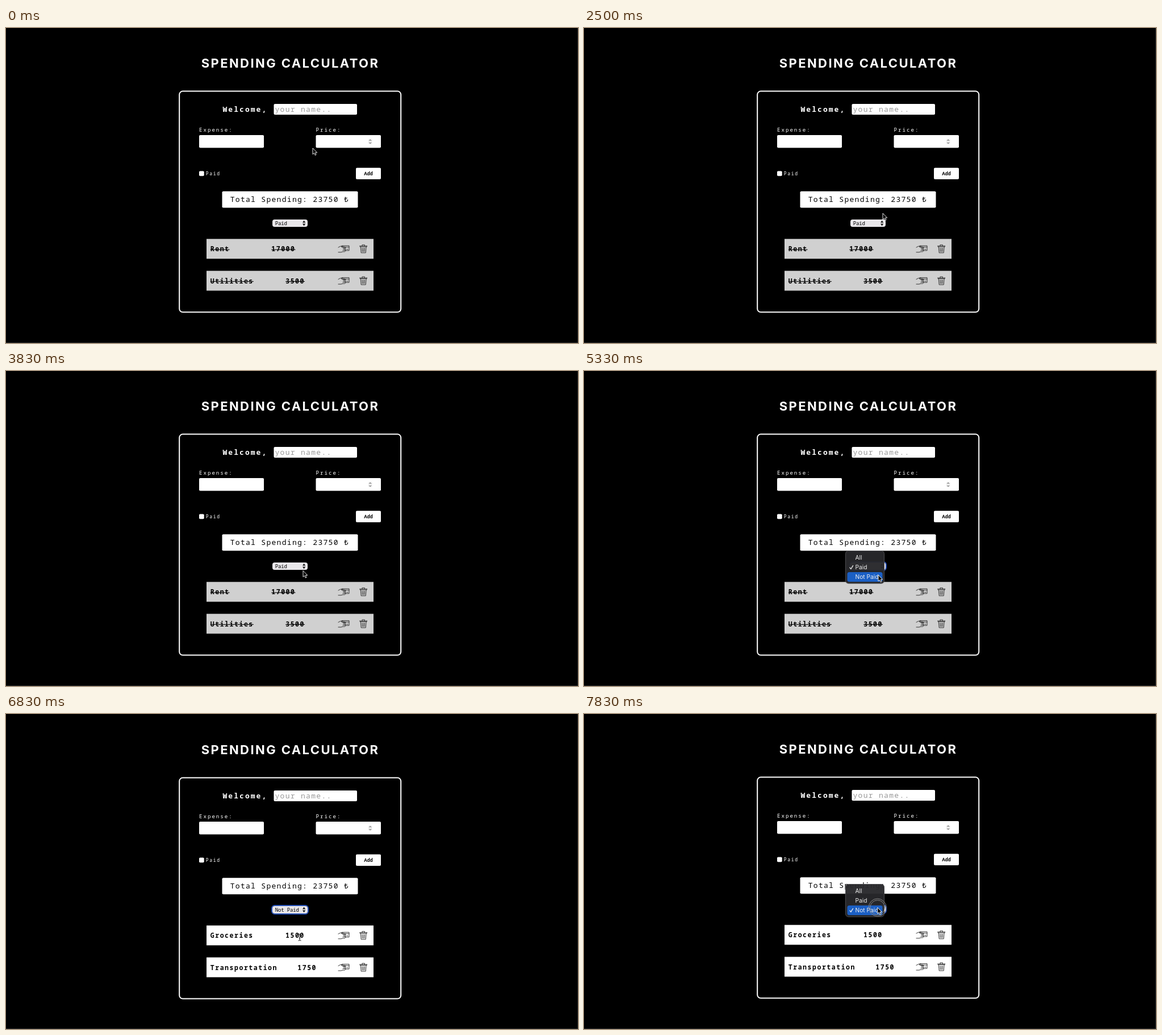
An HTML page for the animation above (8000 ms loop, 1007 by 556 pixels).

```html
<!DOCTYPE html>
<html lang="en">
<head>
<meta charset="utf-8">
<title>Spending Calculator</title>
<style>
  html, body { margin: 0; width: 100%; height: 100%; overflow: hidden; background: #000; }
  svg { display: block; width: 1007px; height: 556px; }
  text { font-family: "Noto Sans Mono", "DejaVu Sans Mono", monospace; white-space: pre; }
  .title { font: 700 22px Inter, sans-serif; letter-spacing: 2.4px; text-anchor: middle; }
  .welcome { font-size: 13px; font-weight: 700; letter-spacing: 2.05px; }
  .hint { font-size: 13px; letter-spacing: 1.3px; fill: #999; }
  .label { font-size: 9.2px; letter-spacing: 1.95px; }
  .small { font-size: 8px; letter-spacing: 1.7px; }
  .add { font: 700 8px "Open Sans", sans-serif; text-anchor: middle; }
  .total { font-size: 13px; font-weight: 500; letter-spacing: 1.3px; }
  .choice { font-size: 9px; letter-spacing: -.15px; }
  .item { font-size: 11.5px; font-weight: 700; letter-spacing: 1.54px; }
  .icon { fill: none; stroke: #222; stroke-width: .9; stroke-linejoin: round; stroke-linecap: round; }
  .option { font: 10.2px Inter, sans-serif; fill: #f0f0f0; }
  .ring circle { fill: none; stroke: #8a8a8a; stroke-width: 1; }
  .hidden { display: none; }
</style>
</head>
<body>
<svg viewBox="0 0 1007 556" fill="#fff">
  <defs>
    <g id="pay" class="icon">
      <path d="M6 -3.5V-5.5H19V3H12M6 -3H19M15 .8H17"/>
      <path d="M0 -2.5 3.5 -4.5H6L12.5 -3 13 -1.5 8 -1.7M0 6H5L8 5H11.5L13 3.4 11 2.2 8 2.6M11 2.2 13.3 1.2 12.6 -.2 9 .2"/>
    </g>
    <g id="trash" class="icon">
      <path d="M-6.3 -5H6.3M-6 -5V-3.6H6V-5M-2.3 -5V-7H2.3V-5M-5 -3.4-4 7H4L5 -3.4"/>
      <path d="M-2.4 -1.5-2 5M0 -1.5V5M2.4 -1.5 2 5"/>
    </g>
  </defs>

  <path d="M1006 0h1v556h-1zM0 555h1007v1H0z" fill="#2a2a2a"/>

  <g id="page">
    <text class="title" x="500.5" y="70">SPENDING CALCULATOR</text>
    <rect x="305.2" y="111.6" width="390" height="390" rx="6" fill="none" stroke="#fff" stroke-width="2"/>

    <text class="welcome" x="381.5" y="148">Welcome,</text>
    <rect x="471.5" y="134" width="146.5" height="19" rx="2"/>
    <text class="hint" x="473.5" y="148">your name..</text>

    <text class="label" x="340" y="183.2">Expense:</text>
    <rect x="340" y="189" width="114" height="22.5" rx="2"/>
    <text class="label" x="545.6" y="183.2">Price:</text>
    <rect x="545.5" y="189" width="114.5" height="22.5" rx="2"/>
    <rect x="638" y="195.3" width="6.4" height="10.2" rx="2.5" fill="#eee"/>
    <path d="M639.4 199 641.2 197.2 643 199M639.4 202 641.2 203.8 643 202" fill="none" stroke="#333" stroke-width=".9"/>

    <rect x="340" y="252.5" width="8.7" height="8.7" rx="1.8"/>
    <text class="small" x="351.8" y="260">Paid</text>
    <rect x="616" y="246.7" width="44" height="20.4" rx="2"/>
    <text class="add" x="638" y="260" fill="#000">Add</text>

    <rect x="380.5" y="288.3" width="239" height="29" rx="2"/>
    <text class="total" x="394.7" y="307.3" fill="#000">Total Spending: 23750 ₺</text>

    <rect id="focus" x="468" y="337" width="64" height="15" rx="5" fill="none" stroke="#2450b8" stroke-width="2"/>
    <rect x="469" y="338" width="62" height="13" rx="4" fill="#e9e7ea"/>
    <text class="choice" id="choice" x="473.8" y="347.6" fill="#000"></text>
    <path d="M522 343.4 524.6 339.8 527.2 343.4zM522 345.6 524.6 349.2 527.2 345.6z" fill="#111"/>

    <g id="paid"></g>
    <g id="unpaid"></g>
  </g>

  <g id="menu">
    <rect x="460.5" y="317.5" width="68" height="57.5" rx="5" fill="#28282b" fill-opacity=".96" stroke="#4c4c4f"/>
    <rect id="mark" x="463.5" width="62" height="17" rx="3.5" fill="#1b5fc4"/>
    <text class="option" x="477.5" y="333.4">All</text>
    <text class="option" x="477.5" y="350.2">Paid</text>
    <text class="option" x="477.5" y="367.1">Not Paid</text>
    <path id="check" d="M467.6 0 469.9 2.8 473.8 -3.6" fill="none" stroke="#f0f0f0" stroke-width="1.3"/>
  </g>

  <g id="cursor">
    <g class="ring" id="ring"><circle r="15.5"/><circle r="12.8"/></g>
    <path id="arrow" d="M0 0V11L2.5 8.7 4.2 12.6 6 11.8 4.4 8H7.7Z" fill="#000" stroke="#fff" stroke-width=".9"/>
    <path id="beam" d="M-2.5 -6Q0 -6 0 -4.5Q0 -6 2.5 -6M0 -4.5V4.5M-2.5 6Q0 6 0 4.5Q0 6 2.5 6M-1.2 1.5H1.2" fill="none" stroke="#111" stroke-width="1"/>
  </g>
</svg>

<script>
const $ = id => document.getElementById(id);
const LOOP = 8000, PITCH = 8.44;

function word(x, y, str, struck) {
  const line = struck
    ? `<rect x="${x}" y="${y - 3.7}" width="${str.length * PITCH}" height="1.1" fill="#000"/>` : '';
  return `<text class="item" x="${x}" y="${y}" fill="#000">${str}</text>${line}`;
}

function row(y, name, price, priceX, struck) {
  return `<rect x="353" y="${y}" width="294" height="35" fill="${struck ? '#d0d0d0' : '#fff'}"/>
    ${word(359.8, y + 22, name, struck)}${word(priceX, y + 22, price, struck)}
    <use href="#pay" x="585" y="${y + 17.5}"/><use href="#trash" x="629.2" y="${y + 17.5}"/>`;
}

$('paid').innerHTML = row(372.3, 'Rent', '17000', 467.3, true) + row(428.6, 'Utilities', '3500', 492.2, true);
$('unpaid').innerHTML = row(372.3, 'Groceries', '1500', 492, false) + row(428.6, 'Transportation', '1750', 513.3, false);

// time, cursor x, cursor y, scroll, extra state
const steps = [
  [0, 540, 212, 0],
  [170, 563, 58, 0],
  [2500, 526, 327, 0],
  [2670, 512, 357, 0],
  [3000, 512, 372, 0],
  [3170, 513, 392, -1],
  [3330, 513, 403, -2],
  [3500, 513, 403.5, -2],
  [3670, 517, 384, -1],
  [3830, 523, 352.5, 0],
  [4000, 523, 346, 0],
  [4170, 522, 343, 0],
  [4330, 522, 343, 0, { ring: 1, open: 1, hover: 1 }],
  [4500, 522, 343, 0, { open: 1, hover: 1 }],
  [4830, 520, 348, 0, { open: 1, hover: 1 }],
  [5000, 519, 354, 0, { open: 1, hover: 1 }],
  [5170, 518, 358, 0, { open: 1, hover: 2 }],
  [5330, 518, 360, 0, { open: 1, hover: 2 }],
  [5500, 518, 360, 0, { open: 1, hover: 2, ring: 1 }],
  [5670, 518, 360, 0],
  [6000, 518, 368, 0],
  [6170, 517, 382, 0],
  [6330, 517, 393, 0, { beam: 1 }],
  [6500, 517, 394, 1, { beam: 1 }],
  [6670, 517, 394, 2, { beam: 1 }],
  [6830, 517, 394, 1, { beam: 1 }],
  [7000, 517, 394, 1, { beam: 1 }],
  [7170, 517, 394, 0, { beam: 1 }],
  [7330, 517, 390, 0, { beam: 1 }],
  [7500, 517, 376, 0],
  [7670, 517, 344, 0],
  [7830, 516.7, 341.5, 0, { open: 1, hover: 2, ring: 1 }]
];
const FOCUSED = 4330, FILTERED = 5670;

const show = (id, on) => $(id).classList.toggle('hidden', !on);
const move = (id, x, y) => $(id).setAttribute('transform', `translate(${x} ${y})`);

function draw(t) {
  const [, x, y, scroll, state = {}] = steps.findLast(s => s[0] <= t);
  const filtered = t >= FILTERED;
  const checked = filtered ? 2 : 1;
  move('page', 0, scroll);
  move('cursor', x, y);
  show('arrow', !state.beam);
  show('beam', state.beam);
  show('ring', state.ring);
  show('focus', t >= FOCUSED);
  show('paid', !filtered);
  show('unpaid', filtered);
  $('choice').textContent = filtered ? 'Not Paid' : 'Paid';

  // The open menu sits with its checked option over the select box.
  show('menu', state.open);
  move('menu', 0, (1 - checked) * 17);
  move('mark', 0, 321 + 17 * (state.hover || 0));
  move('check', 0, 329.8 + 16.9 * checked);
}

const start = performance.now();
function tick() {
  draw((performance.now() - start) % LOOP);
  requestAnimationFrame(tick);
}
tick();
</script>
</body>
</html>
```
